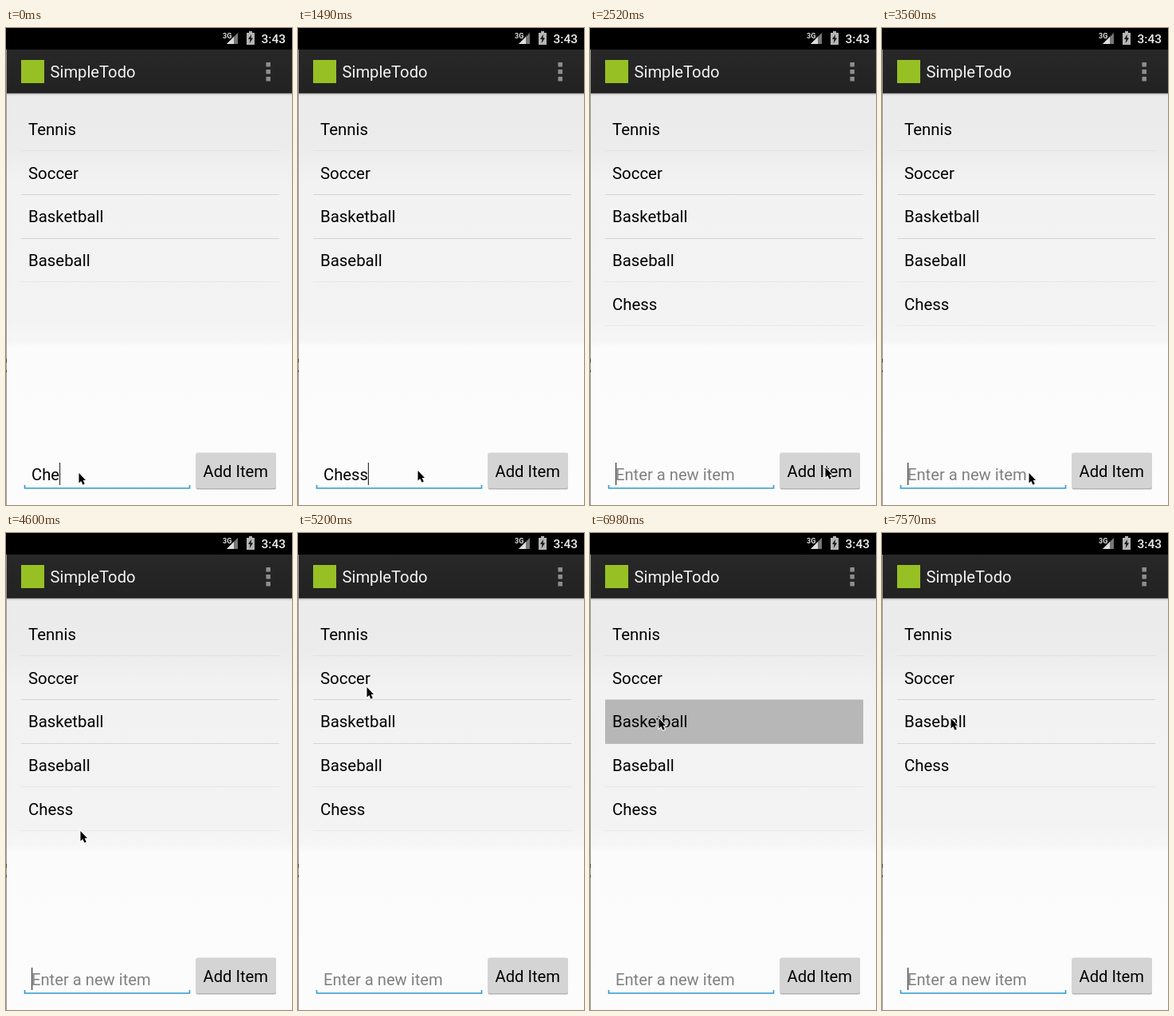
An HTML page for the animation above (8 s loop, 359 px wide and 597 px high).

```html
<!DOCTYPE html>
<html lang="en">
<head>
<meta charset="utf-8">
<title>Todo list</title>
<style>
  html, body { margin: 0; width: 100%; height: 100%; overflow: hidden; background: #000; }
  svg { display: block; width: 359px; height: 597px; font: 20.2px Roboto, sans-serif; }
  #rows { font-size: 20.4px; }
</style>
</head>
<body>
<svg viewBox="0 0 359 597">
  <defs>
    <linearGradient id="page" gradientUnits="userSpaceOnUse" x1="0" y1="82" x2="0" y2="597">
      <stop offset="0" stop-color="#ebebeb"/>
      <stop offset=".13" stop-color="#ececec"/>
      <stop offset=".215" stop-color="#f2f2f2"/>
      <stop offset=".55" stop-color="#f3f3f3"/>
      <stop offset=".6" stop-color="#f6f6f6"/>
      <stop offset=".615" stop-color="#fbfbfb"/>
      <stop offset="1" stop-color="#fcfcfc"/>
    </linearGradient>
    <linearGradient id="bar" x2="0" y2="1">
      <stop offset="0" stop-color="#282828"/>
      <stop offset="1" stop-color="#222"/>
    </linearGradient>
  </defs>

  <rect y="82" width="359" height="515" fill="url(#page)"/>

  <!-- status bar -->
  <rect width="359" height="27" fill="#000"/>
  <text x="272" y="13" font-size="9" font-weight="700" fill="#ddd">3G</text>
  <path d="M277 20L291 6V20Z" fill="#777"/>
  <path d="M277 20L286 11V20Z" fill="#ddd"/>
  <path d="M302 6h3v-2h4v2h3v15h-10z" fill="#b4b4b4"/>
  <path d="M308 8l-4 6h2.5l-.8 5 4.3-6.5h-2.5z" fill="#111"/>
  <text x="320.5" y="19" font-size="15.5" font-weight="500" fill="#eee">3:43</text>

  <!-- action bar -->
  <rect y="27" width="359" height="54" fill="url(#bar)"/>
  <rect y="81" width="359" height="1" fill="#444"/>
  <rect y="82" width="359" height="2" opacity=".12"/>
  <rect x="19" y="40" width="29" height="29" fill="#97c024"/>
  <text x="55.5" y="62" fill="#f3f3f3">SimpleTodo</text>
  <path d="M329.2 43V67" stroke="#8e8e8e" stroke-width="5.5" stroke-dasharray="5.5 3.5"/>

  <!-- window edge -->
  <rect y="27" width="1" height="570" fill="#999"/>
  <path d="M.5 414v5m0 9v3" stroke="#55502a"/>

  <rect id="press" x="19" y="209" width="324" height="54.5"/>
  <g id="rows"></g>

  <!-- input and button -->
  <path d="M23.5 572V576H230.5V572" fill="none" stroke="#2f9ad0" stroke-width="1.6"/>
  <text id="field" x="32" y="566"></text>
  <rect id="caret" y="544" width="1.2" height="28" fill="#333"/>
  <rect x="238.5" y="532" width="100.5" height="45.5" rx="2" fill="#b2b2b2"/>
  <rect id="button" x="238.5" y="531.5" width="100.5" height="44.5" rx="2"/>
  <text x="247.5" y="562" fill="#000">Add Item</text>

  <path id="pointer" d="M.5 1V13.5L3.3 11 5.5 15.7 7.8 14.6 5.6 10H9Z"
        fill="#000" stroke="#fff" stroke-width="2" paint-order="stroke"/>
</svg>
<script>
// All times are in ticks of the screen refresh
const TICK = 148, LOOP = 8000, ROW = 54.8, BLINK = 3.42;
const PRESS = 14, ADD = 16.1, HOLD = 44, REMOVE = 48;
const sports = ["Tennis", "Soccer", "Basketball", "Baseball", "Chess"];
const typed = [[0, "Che"], [1, "Ches"], [8, "Chess"], [ADD, ""]];
const path = [
  [9, 91, 556], [10, 150, 553], [13, 295, 549],   // to the button
  [19, 295, 549], [27, 118, 560],                 // back to the input
  [29, 118, 560], [31, 93, 372], [35, 86, 192],   // up the list
  [38, 86, 192], [41, 86, 231]                    // onto a row
];

const $ = id => document.getElementById(id);
const grey = v => `rgb(${v},${v},${v})`;
const show = (el, on) => el.style.display = on ? "" : "none";
const addTo = (parent, tag, attrs) => {
  const el = document.createElementNS("http://www.w3.org/2000/svg", tag);
  for (const k in attrs) el.setAttribute(k, attrs[k]);
  return parent.appendChild(el);
};

const rows = sports.map((_, i) => ({
  line: addTo($("rows"), "rect", {
    x: 19, y: Math.round(153 + i * ROW), width: 324, height: 1,
    opacity: Math.abs(i - 1.5) < 1 ? .13 : .05
  }),
  label: addTo($("rows"), "text", { x: 28, y: 133.8 + i * ROW })
}));

function pointerAt(n) {
  const i = path.findIndex(p => p[0] > n);
  if (i < 0) return path.at(-1).slice(1);
  const [t0, ...from] = path[Math.max(i - 1, 0)], [t1, ...to] = path[i];
  const k = Math.max(0, (n - t0) / (t1 - t0));
  return from.map((v, j) => Math.round(v + (to[j] - v) * k));
}

function draw(now) {
  const n = Math.floor(now % LOOP / TICK);

  const list = sports.filter(s =>
    s === "Chess" ? n >= ADD : s !== "Basketball" || n < REMOVE);
  rows.forEach(({ line, label }, i) => {
    label.textContent = list[i] || "";
    show(line, i < list.length);
  });

  // A held row darkens until it is removed
  show($("press"), n >= HOLD && n < REMOVE);
  $("press").setAttribute("fill", grey(219 - 12 * (n - HOLD)));
  $("button").setAttribute("fill", grey(n >= PRESS && n < ADD ? 180 : 212));

  const [edited, text] = typed.findLast(s => s[0] <= n);
  const field = $("field");
  field.textContent = text || "Enter a new item";
  field.setAttribute("fill", grey(text ? 0 : 128));
  $("caret").setAttribute("x", 32 + (text ? field.getComputedTextLength() : 0));
  show($("caret"), Math.floor((n - edited) / BLINK) % 2 === 0);

  $("pointer").setAttribute("transform", `translate(${pointerAt(n)})`);
}

const begin = performance.now();
function frame() {
  draw(performance.now() - begin);
  requestAnimationFrame(frame);
}
frame();
</script>
</body>
</html>
```
